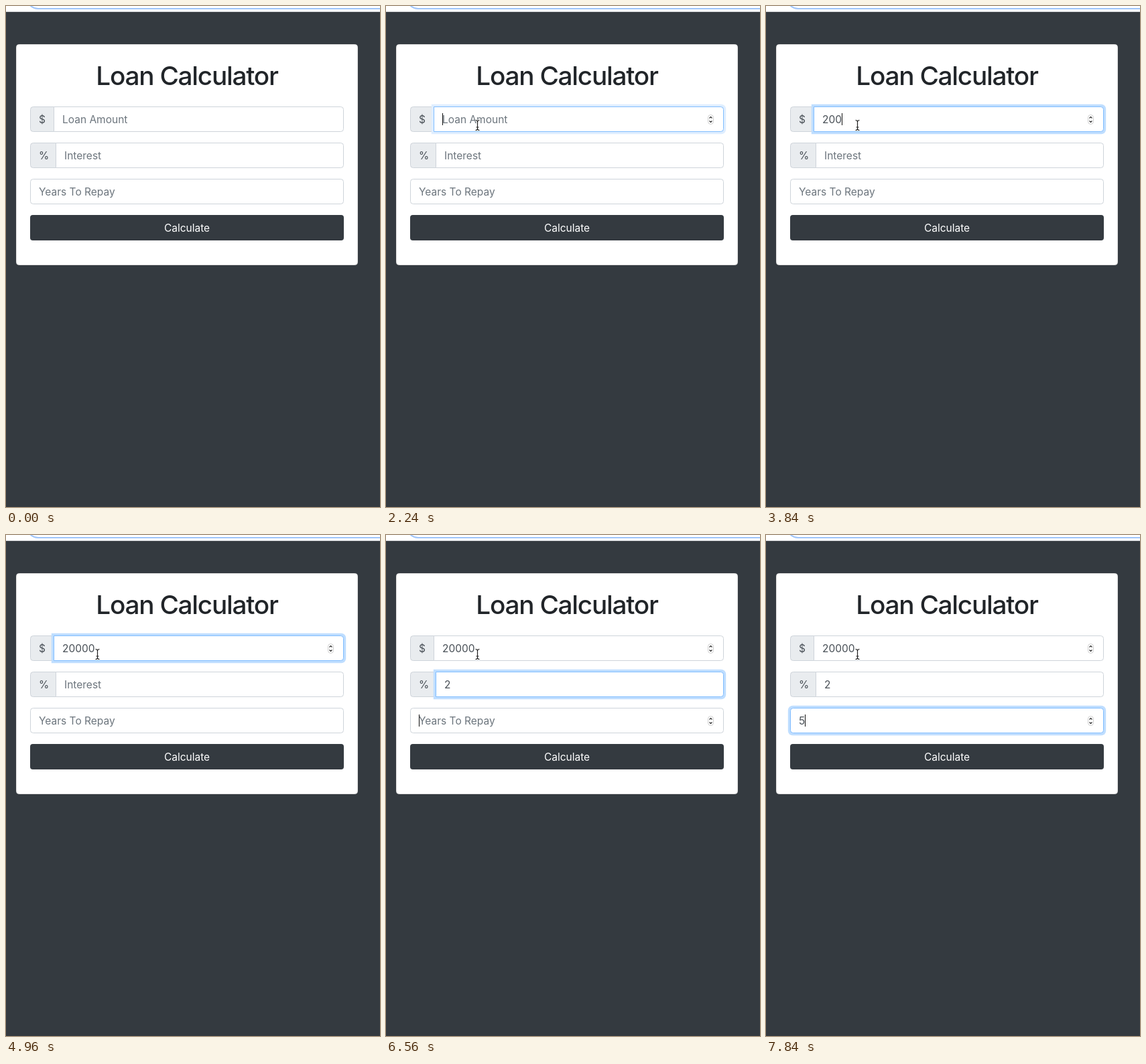
An HTML page with a canvas for the animation above (8000 ms loop, 558x748 px).

```html
<!DOCTYPE html>
<html lang="en">
<head>
<meta charset="utf-8">
<title>Loan Calculator</title>
<style>
  html, body { margin: 0; width: 100%; height: 100%; overflow: hidden; background: #343a40; }
  canvas { display: block; }
</style>
</head>
<body>
<canvas id="stage" width="558" height="748"></canvas>
<script>
const ctx = document.getElementById('stage').getContext('2d');
const LOOP = 8000, STEP = 160;
const DARK = '#343a40', INK = '#495057', MUTED = '#6c757d', LINE = '#ced4da';
const FAMILY = 'Inter, Roboto, sans-serif';

const fields = [
  { x: 71, y: 150, hint: 'Loan Amount', sign: '$' },
  { x: 74, y: 204, hint: 'Interest', sign: '%' },
  { x: 36, y: 258, hint: 'Years To Repay' }
];

function box(x, y, w, h, radii, fill, stroke) {
  const d = stroke ? 0.5 : 0;
  ctx.beginPath();
  ctx.roundRect(x + d, y + d, w - 2 * d, h - 2 * d, radii);
  if (fill) { ctx.fillStyle = fill; ctx.fill(); }
  if (stroke) { ctx.strokeStyle = stroke; ctx.lineWidth = 1; ctx.stroke(); }
}

function text(str, x, y, color, { size = 15.5, weight = 400, align = 'left', spacing = 0 } = {}) {
  ctx.font = `${weight} ${size}px ${FAMILY}`;
  ctx.letterSpacing = spacing + 'px';
  ctx.textAlign = align;
  ctx.fillStyle = color;
  ctx.fillText(str, x, y);
  return ctx.measureText(str).width;
}

function path(points, close) {
  ctx.beginPath();
  points.forEach(([x, y]) => ctx.lineTo(x, y));
  if (close) ctx.closePath();
}

function spinner(y) {
  box(480, y + 12, 9, 15, 4, '#fff', '#cfcfcf');
  ctx.strokeStyle = '#333';
  ctx.lineWidth = 1.2;
  for (const s of [-1, 1]) {
    const cy = y + 19.5 + s * 2;
    path([[482.5, cy], [484.5, cy + s * 2], [486.5, cy]]);
    ctx.stroke();
  }
}

function drawField({ x, y, hint, sign }, { value, glow, caret, spin }) {
  const w = 504 - x;
  if (sign) {
    box(36, y, x - 35, 38, [4, 0, 0, 4], '#e9ecef', LINE);
    text(sign, 49, y + 25, INK);
  }
  const radii = sign ? [0, 4, 4, 0] : 4;
  if (glow) {
    const outer = sign ? [0, 7, 7, 0] : 7;
    box(x - 3.2, y - 3.2, w + 6.4, 44.4, outer, '#fff');
    box(x - 3.2, y - 3.2, w + 6.4, 44.4, outer, `rgba(0,123,255,${0.25 * glow})`);
  }
  box(x, y, w, 38, radii, '#fff', glow ? '#80bdff' : LINE);
  const width = text(value || hint, x + 13, y + 25, value ? INK : MUTED);
  if (spin) spinner(y);
  if (caret) {
    ctx.fillStyle = '#111';
    ctx.fillRect(Math.round(x + 13 + (value ? width : 0)), y + 10, 1, 18);
  }
}

function arrow(x, y) {
  path([[0, 0], [0, 12.6], [2.8, 10], [5, 15.2], [7.2, 14.2], [5, 9.2], [8.8, 9.2]]
    .map(([px, py]) => [x + px, y + py]), true);
  ctx.lineJoin = 'round';
  ctx.strokeStyle = '#fff';
  ctx.lineWidth = 2;
  ctx.stroke();
  ctx.fillStyle = '#000';
  ctx.fill();
}

function beam(x, y) {
  for (const [color, width] of [['#fff', 2.6], ['#222', 1.2]]) {
    ctx.strokeStyle = color;
    ctx.lineWidth = width;
    ctx.beginPath();
    for (const s of [-1, 1]) {
      ctx.moveTo(x - 3, y + s * 7.5);
      ctx.quadraticCurveTo(x, y + s * 7.5, x, y + s * 5);
      ctx.quadraticCurveTo(x, y + s * 7.5, x + 3, y + s * 7.5);
    }
    ctx.moveTo(x, y - 5.5);
    ctx.lineTo(x, y + 5.5);
    ctx.moveTo(x - 2, y + 3);
    ctx.lineTo(x + 2, y + 3);
    ctx.stroke();
  }
}

function drawPointer(t) {
  if (t < 160) return;
  if (t < 1760) {
    const p = Math.min(1, Math.max(0, (t - 320) / 800));
    const e = p * p * (3 - 2 * p);
    arrow(224 - 29 * e, 226 - 54 * e);
  } else {
    beam(t < 1920 ? 150.5 : 136.5, 178);
  }
}

const within = (t, a, b) => t >= a && t < b;

function states(t) {
  const typed = t < 3200 ? 0 : Math.min(5, 1 + Math.floor((t - 3200) / 320));
  return [
    {
      value: '20000'.slice(0, typed),
      glow: within(t, 2240, 5280) ? (t < 2400 ? 0.5 : 1) : 0,
      caret: within(t, 2240, 2720) || within(t, 3200, 4960),
      spin: t >= 1760
    },
    {
      value: t >= 6240 ? '2' : '',
      glow: within(t, 5280, 6720) ? 1 : 0,
      caret: within(t, 5280, 5760) || within(t, 6240, 6560),
      spin: within(t, 5280, 6560)
    },
    {
      value: t >= 7840 ? '5' : '',
      glow: t >= 6720 ? 1 : 0,
      caret: within(t, 6560, 7040) || t >= 7520,
      spin: t >= 6560
    }
  ];
}

function drawPage() {
  ctx.fillStyle = DARK;
  ctx.fillRect(0, 0, 558, 748);
  ctx.fillStyle = '#fff';
  ctx.fillRect(0, 0, 558, 8);
  ctx.fillStyle = '#d0d2d4';
  ctx.fillRect(0, 8, 558, 1);

  // Lower edge of the address bar
  ctx.beginPath();
  ctx.moveTo(560, 4);
  ctx.lineTo(48, 4);
  ctx.arc(48, -13, 17, Math.PI / 2, Math.PI);
  ctx.strokeStyle = '#9fc5fa';
  ctx.lineWidth = 2;
  ctx.stroke();

  box(15, 57, 510, 330, 4, '#fff', '#dfdfdf');
  text('Loan Calculator', 270, 118, '#212529', { size: 38.75, weight: 500, align: 'center', spacing: -1.25 });
  box(36, 312, 468, 38, 4, DARK);
  text('Calculate', 270, 337, '#fff', { align: 'center' });
}

function frame(now) {
  const t = Math.floor((now % LOOP) / STEP) * STEP;
  const state = states(t);
  drawPage();
  fields.forEach((field, i) => drawField(field, state[i]));
  drawPointer(t);
  requestAnimationFrame(frame);
}

requestAnimationFrame(frame);
</script>
</body>
</html>
```
